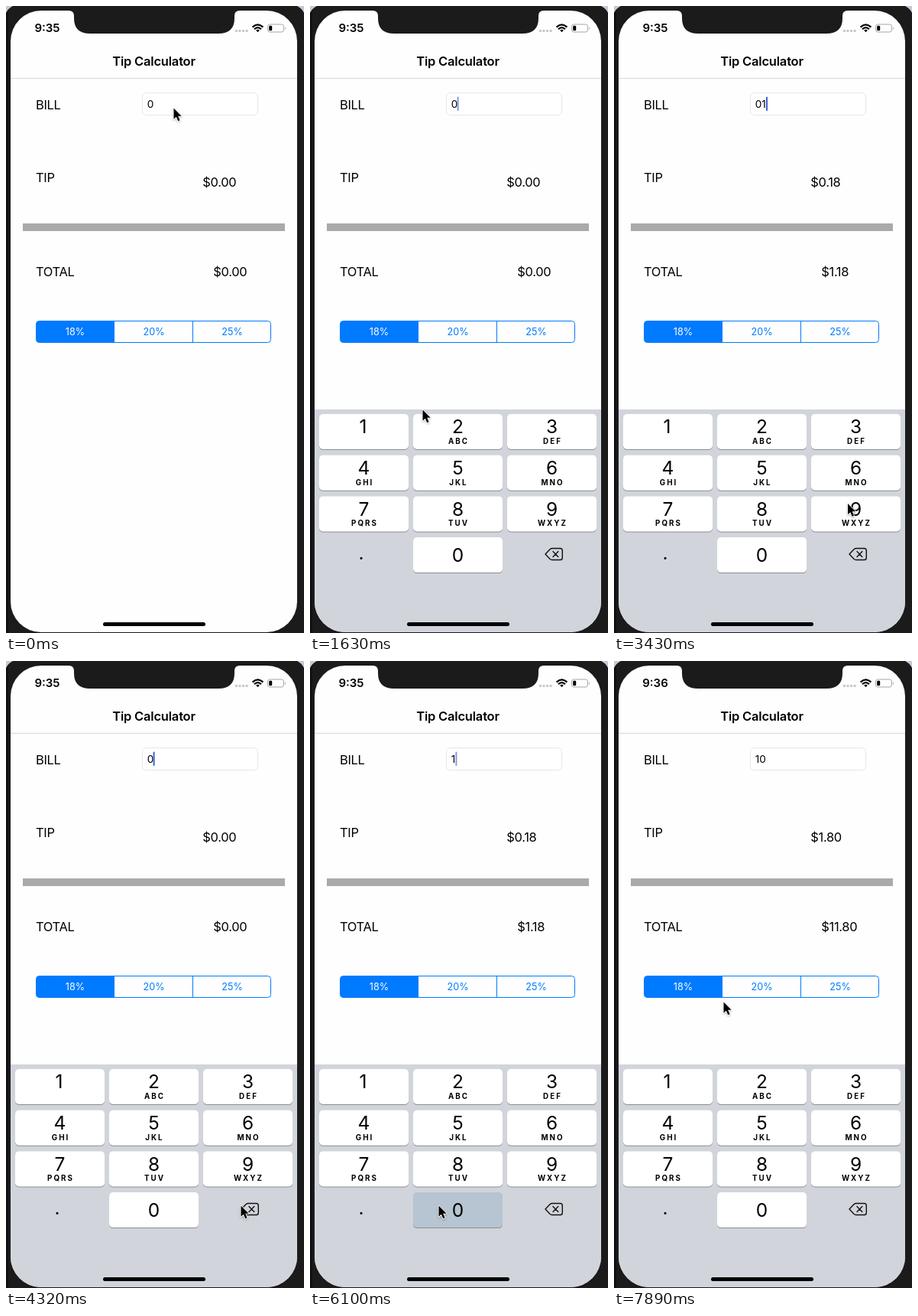
These frames come from a looping animation (390 by 819 pixels, 8 s). An HTML page:

```html
<!DOCTYPE html>
<html lang="en">
<head>
<meta charset="utf-8">
<title>Tip Calculator</title>
<style>
  html, body { margin: 0; width: 100%; height: 100%; overflow: hidden; background: #1b1b1c; }
  svg { display: block; width: 390px; height: 819px; }
  text { font-family: Inter, Roboto, sans-serif; fill: #000; white-space: pre; }
  .label { font-size: 16.5px; letter-spacing: -.35px; }
  .title { font-size: 16.5px; font-weight: 600; letter-spacing: -.2px; }
  .clock { font-size: 15px; font-weight: 600; }
  .field { font-size: 13.6px; letter-spacing: -.1px; }
  .seg { font-size: 12.6px; fill: #007aff; }
  .digit { font-size: 24.5px; }
  .letters { font-size: 9.8px; font-weight: 700; letter-spacing: 2px; }
  .title, .clock, .seg, .digit, .letters { text-anchor: middle; }
</style>
</head>
<body>
<svg viewBox="0 0 390 819">
  <defs>
    <clipPath id="screen"><rect x="6" y="6" width="375" height="812" rx="40"/></clipPath>
    <filter id="soft" x="-50%" y="-50%" width="200%" height="200%">
      <feDropShadow dx="0" dy="1" stdDeviation="1" flood-opacity=".35"/>
    </filter>
  </defs>

  <rect width="390" height="819" fill="#1b1b1c"/>
  <rect width="3" height="819" fill="#111112"/>
  <path d="M0 0H9Q3 3 0 9ZM390 0H381Q387 3 390 9Z" fill="#c3cbd6"/>

  <g clip-path="url(#screen)">
    <rect x="6" y="6" width="375" height="812" fill="#fefefe"/>
    <path d="M6 94.5H381" stroke="#d9d9d9"/>
    <text class="title" x="193.5" y="78">Tip Calculator</text>

    <text class="label" x="39" y="134.5">BILL</text>
    <text class="label" x="39" y="229.5">TIP</text>
    <text class="label" x="39" y="352.5">TOTAL</text>
    <text class="label" id="tip" x="257.3" y="235.5"></text>
    <text class="label" id="total" x="271.3" y="352.5"></text>
    <rect x="22" y="284" width="343" height="10" fill="#aaa"/>

    <rect x="178.5" y="113.5" width="151" height="29" rx="5" fill="#fff" stroke="#e6e6e6"/>
    <text class="field" id="bill" x="184.8" y="132.5"></text>
    <rect id="caret" y="118.5" width="2" height="18.5" rx="1" fill="#3c63d9"/>

    <path d="M141.5 411.5H43.5a4 4 0 0 0-4 4v20a4 4 0 0 0 4 4H141.5Z" fill="#007aff"/>
    <rect x="39.5" y="411.5" width="307" height="28" rx="4" fill="none" stroke="#007aff"/>
    <path d="M141.5 411.5v28M244.5 411.5v28" stroke="#007aff"/>
    <text class="seg" x="90.5" y="430" style="fill:#fff">18%</text>
    <text class="seg" x="193.5" y="430">20%</text>
    <text class="seg" x="296" y="430">25%</text>

    <g id="pad">
      <rect x="6" y="527" width="375" height="300" fill="#d1d4db"/>
      <text class="digit" x="67" y="723">.</text>
      <path d="M308 716L314.2 709.6Q315.2 708.5 316.8 708.5H327.5Q330.3 708.5 330.3 711.3V720.7Q330.3 723.5 327.5 723.5H316.8Q315.2 723.5 314.2 722.4ZM318 712.6L324.8 719.4M324.8 712.6L318 719.4"
        fill="none" stroke="#111" stroke-width="1.4" stroke-linejoin="round" stroke-linecap="round"/>
    </g>
    <rect x="127" y="805" width="134" height="5" rx="2.5"/>
  </g>

  <path d="M82 5V6Q89 6 89 13V16Q89 36 110 36H278Q299 36 299 16V13Q299 6 306 6V5Z" fill="#1b1b1c"/>
  <text class="clock" id="clock" x="54" y="34.3"></text>
  <g fill="#c8c8ca">
    <circle cx="301.5" cy="32.5" r="1.7"/><circle cx="306" cy="32.5" r="1.7"/>
    <circle cx="310.6" cy="32.5" r="1.7"/><circle cx="315.1" cy="32.5" r="1.7"/>
  </g>
  <g fill="none" stroke="#000" stroke-width="2.2">
    <path d="M322.6 27.6Q329.5 21 336.4 27.6M325 30.2Q329.5 25.9 334 30.2"/>
    <path d="M327.2 31.8Q329.5 29.8 331.8 31.8L329.5 34.2Z" fill="#000" stroke="none"/>
  </g>
  <rect x="342.5" y="24" width="21" height="10" rx="2.8" fill="none" stroke="#a5a5a7"/>
  <path d="M365 27.2Q367 29 365 30.8Z" fill="#a5a5a7"/>
  <rect x="344.2" y="25.7" width="4" height="6.6" rx="1.3"/>

  <path id="cursor" d="M0 0V14.3L3.3 11.2L5.7 16.8L8.1 15.8L5.7 10.3H10.2Z"
    stroke="#fff" stroke-width="1.6" paint-order="stroke" stroke-linejoin="round" filter="url(#soft)"/>
</svg>

<script>
const LOOP = 8000, STEP = 148.87;
const $ = id => document.getElementById(id);
const pad = $('pad');

function add(tag, attrs, text = '') {
  const el = document.createElementNS('http://www.w3.org/2000/svg', tag);
  for (const k in attrs) el.setAttribute(k, attrs[k]);
  el.textContent = text;
  return pad.appendChild(el);
}

function addKey(digit, col, row, letters) {
  const x = 12 + col * 123, y = 533 + row * 53.7, mid = x + 58.5;
  const box = { x, width: 117, height: 46, rx: 5 };
  add('rect', { ...box, y: y + 1, fill: '#8b8d92' });
  const face = add('rect', { ...box, y, fill: '#fff' });
  add('text', { class: 'digit', x: mid - (digit === '1' ? 1 : 0), y: y + (row === 3 ? 31.5 : 25.3) }, digit);
  add('text', { class: 'letters', x: mid + 1, y: y + 39 }, letters);
  return face;
}

const faces = {};
['', 'ABC', 'DEF', 'GHI', 'JKL', 'MNO', 'PQRS', 'TUV', 'WXYZ'].forEach((letters, i) => {
  faces[i + 1] = addKey(String(i + 1), i % 3, Math.floor(i / 3), letters);
});
faces[0] = addKey('0', 1, 3, '');

// Pointer stops: [step, x, y]
const path = [
  [0, 219.5, 133.5], [1, 218.5, 134.5], [8, 218.5, 134.5], [10, 175, 420], [11, 147.5, 527.5],
  [13, 92, 556], [16, 91, 558.5], [19, 268, 688], [20, 302, 618], [21, 303, 612], [22, 303, 612],
  [23, 306, 650], [25, 306, 709], [27, 307.5, 711.5], [30, 307.5, 711.5], [33, 190, 640],
  [35, 92, 562], [36, 92, 562], [39, 150, 690], [41, 168.5, 711.5], [43, 171, 695],
  [46, 171, 690], [49, 150, 520], [51, 139, 455], [52, 140, 452], [53, 143.5, 445.5]
];

// Field edits: [step, text, caret x]
const edits = [
  [0, '0', 192.6], [6, '0', 192.6], [15, '01', 199], [29, '0', 192.6],
  [31, '', 185], [36, '1', 190.4], [43, '10', 199]
];

// Key presses: [key, first step, end step]
const presses = [[1, 14, 15], [1, 34, 36], [0, 41, 43]];

const lastAt = (list, s) => list.filter(e => e[0] <= s).pop();

function pointer(s) {
  const a = lastAt(path, s), b = path[path.indexOf(a) + 1] || a;
  const k = a === b ? 0 : (s - a[0]) / (b[0] - a[0]);
  return [a[1] + (b[1] - a[1]) * k, a[2] + (b[2] - a[2]) * k];
}

function blink(ms) {
  const p = ms % 870;
  const off = Math.min((p - 430) / 100, (780 - p) / 100);
  return 1 - Math.max(0, Math.min(1, off));
}

function draw(t) {
  const s = Math.min(53, Math.floor((t + 10) / STEP));
  const [since, text, caretX] = lastAt(edits, s);
  const bill = Number(text), tip = bill * 0.18;

  $('bill').textContent = text;
  $('tip').textContent = '$' + tip.toFixed(2);
  $('total').textContent = '$' + (bill + tip).toFixed(2);
  $('clock').textContent = s < 47 ? '9:35' : '9:36';

  $('caret').setAttribute('x', caretX);
  $('caret').setAttribute('opacity', s < 6 ? 0 : blink((s - since) * STEP));

  pad.setAttribute('visibility', s < 6 ? 'hidden' : 'visible');
  pad.setAttribute('transform', `translate(0 ${s === 6 ? 7.5 : 0})`);
  for (const key of [0, 1]) {
    const down = presses.some(([k, from, to]) => k === key && s >= from && s < to);
    faces[key].setAttribute('fill', down ? '#b7c4d1' : '#fff');
  }

  $('cursor').setAttribute('transform', `translate(${pointer(s)})`);
}

const start = performance.now();
function tick() {
  draw((performance.now() - start) % LOOP);
  requestAnimationFrame(tick);
}
tick();
</script>
</body>
</html>
```
